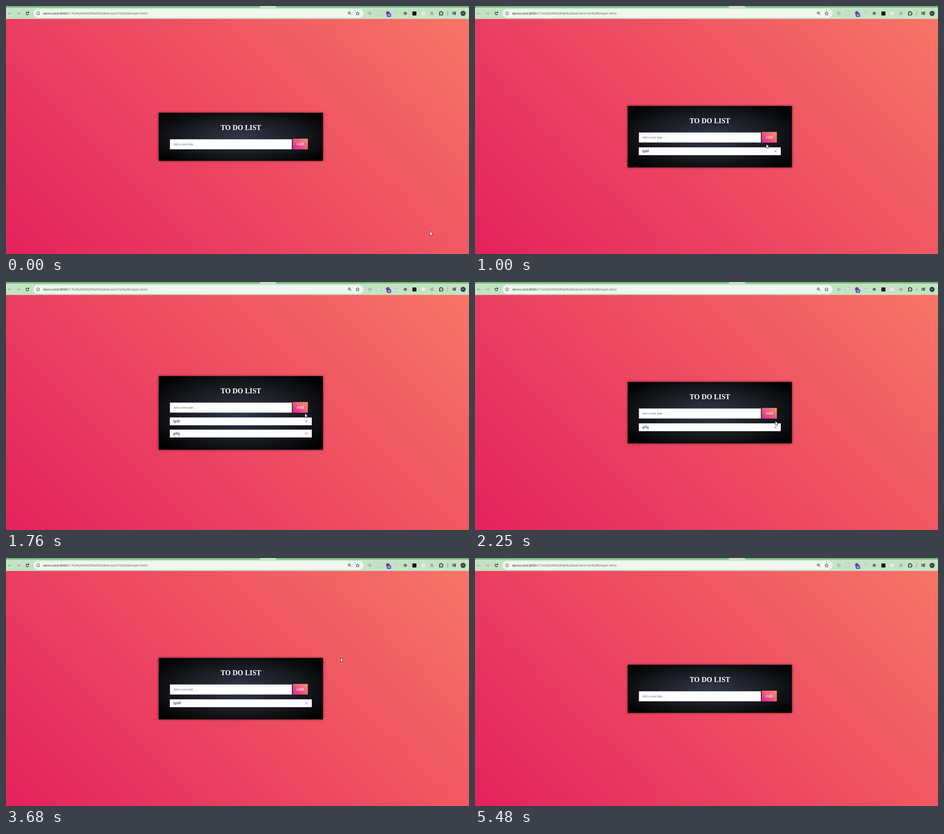
An HTML page that plays this animation: 1022 px wide and 548 px high, repeating every 5660 ms.

```html
<!DOCTYPE html>
<html lang="en">
<head>
<meta charset="utf-8">
<title>To do list</title>
<style>
  html, body { margin: 0; width: 100%; height: 100%; overflow: hidden; }
  svg { display: block; width: 1022px; height: 548px; }
  text { white-space: pre; }
  .url { font: 7.45px "Open Sans", "Noto Sans", sans-serif; fill: #4e5a50; }
  .host { fill: #1d2620; }
  .title { font: bold 15.7px "Liberation Serif", serif; fill: #fff; text-anchor: middle; }
  .field { font: 6.4px "Liberation Sans", sans-serif; }
  .add { font: 9px "Liberation Sans", sans-serif; fill: #fff; text-anchor: middle; }
  .task { font: 8px "Liberation Serif", serif; fill: #15101c; }
  .panel { filter: drop-shadow(0 0 2.7px rgba(0, 0, 0, .7)); }
  .line { fill: none; stroke: #3a423c; stroke-width: 1; }
  .bold { stroke: #1f2621; stroke-width: 1.2; }
  .pale { stroke: #879f89; }
</style>
</head>
<body>
<svg viewBox="0 0 1022 548" xmlns="http://www.w3.org/2000/svg">
  <defs>
    <linearGradient id="page" gradientUnits="userSpaceOnUse" x1="125.75" y1="673.75" x2="896.25" y2="-96.75">
      <stop offset="0" stop-color="#e4225d"/><stop offset="1" stop-color="#f77466"/>
    </linearGradient>
    <radialGradient id="dark" r=".707">
      <stop offset="0" stop-color="#34374a"/><stop offset=".5" stop-color="#191c21"/>
      <stop offset=".9" stop-color="#020203"/><stop offset="1" stop-color="#000"/>
    </radialGradient>
    <linearGradient id="warm" x1="0" y1="1" x2="1" y2="0">
      <stop offset="0" stop-color="#de2393"/><stop offset="1" stop-color="#f5976e"/>
    </linearGradient>
  </defs>

  <rect y="28" width="1022" height="520" fill="url(#page)"/>

  <!-- browser bar -->
  <rect width="1022" height="28.6" fill="#c4e2c5"/>
  <path d="M0 0H562Q561 3.5 557 3.5H0ZM595 0H1022V3.5H600Q596 3.5 595 0Z" fill="#78b87c"/>
  <rect x="61" y="6.5" width="728" height="19.5" rx="9.75" fill="#eef7ee"/>
  <path class="line pale" d="M12 16.3H5.2M8.2 13.2L5.1 16.3L8.2 19.4M24 16.3H30.8M27.8 13.2L30.9 16.3L27.8 19.4"/>
  <path class="line bold" d="M49.6 14.6A3 3 0 1 0 50 17.2M50.2 12.6V15H47.8"/>
  <circle cx="70.8" cy="16.3" r="5.6" fill="#fff"/>
  <circle class="line" cx="70.8" cy="16.3" r="3.5"/>
  <path class="line" d="M70.8 15.8V18.2M70.8 14.2V15"/>
  <text class="url" x="82" y="19"><tspan class="host">demo.test:8000</tspan>/7.Fix%20It%20Flat%20Article/3.Fix%20It/start.html</text>
  <path class="line" d="M760.5 17.5L762.6 19.8M756.3 15.3H759.2"/>
  <circle class="line" cx="757.8" cy="15.3" r="2.6"/>
  <path class="line" d="M776 12.3L777.2 15L780 15.2L777.9 17.1L778.5 19.9L776 18.4L773.5 19.9L774.1 17.1L772 15.2L774.8 15Z"/>
  <circle cx="803" cy="16.3" r="4" fill="#abc6ac"/>
  <rect x="819.3" y="12.8" width="7" height="7" fill="#d6e6d6" stroke="#a5b9a6" stroke-width=".6"/>
  <circle cx="843" cy="15.5" r="4" fill="#5b4494"/>
  <rect x="840.5" y="16" width="9.6" height="8" rx="2" fill="#5d44a5"/>
  <text x="845.3" y="22.2" text-anchor="middle" fill="#fff" style="font:bold 5.5px 'Liberation Sans',sans-serif">10</text>
  <path d="M860 13.5h1.3v1.3h-1.3ZM863.6 13.5h1.3v1.3h-1.3Z" fill="#7f9982"/>
  <circle cx="881.4" cy="16.3" r="3.5" fill="#68756a"/>
  <rect x="897" y="12" width="9" height="9" rx="1" fill="#151817"/>
  <rect x="917" y="12.8" width="8" height="7.4" rx="1" fill="#f4e6df"/>
  <circle cx="940" cy="16.3" r="4" fill="#a4b9a5"/>
  <path class="line bold" d="M956.7 13.4H959V12.2H961.2V13.4H963.5V15.6H964.8V17.6H963.5V20.2H956.7V17.9H958V15.8H956.7Z"/>
  <rect x="974" y="12" width="1.2" height="8.5" fill="#6eb276"/>
  <path class="line bold" d="M985.5 13.5H991M985.5 15.7H991M985.5 17.9H988.5M992 18V13H994"/>
  <circle cx="991" cy="18.2" r="1.4" fill="#1f2621"/>
  <circle cx="1009" cy="16.3" r="5.6" fill="#343b40"/>
  <text x="1009" y="18.2" text-anchor="middle" fill="#e8eee8" style="font:6px 'Open Sans',sans-serif">m</text>

  <!-- card -->
  <g id="card">
    <rect id="back" class="panel" x="337.2" width="362.3" fill="url(#dark)"/>
    <text class="title" x="518.4" y="38.3">TO DO LIST</text>
    <rect x="361.9" y="58.4" width="269.2" height="22.4" fill="#fff" stroke="#77777c" stroke-width=".6"/>
    <text id="field" class="field" x="369.6" y="72"></text>
    <rect id="caret" y="65.5" width=".7" height="8" fill="#111"/>
    <rect x="633" y="57.3" width="33.3" height="23.6" fill="url(#warm)"/>
    <text class="add" x="649.6" y="72">Add</text>
    <rect id="mark" x="656.5" y="64" width=".9" height="10" fill="#fbd3d8"/>
    <g id="tasks"></g>
  </g>

  <circle id="ring" r="6.5" cy="1" fill="#c8b41e" fill-opacity=".72"/>
  <g id="mouse">
    <path id="arrow" d="M0 0V9.3L2.1 7.4L3.5 10.4L5 9.7L3.7 6.8H6.4Z" fill="#fff" stroke="#1a1a1a" stroke-width=".7"/>
    <path id="beam" d="M-1.5 -4.5H1.5M0 -4.5V4.5M-1.5 4.5H1.5" fill="none" stroke="#111" stroke-width=".8"/>
  </g>
</svg>
<script>
const LOOP = 5660, KEY_MS = 40, CLICK_MS = 70, LEAVE = 5170, MARK_END = 5480;
const HOME = { x: 936, y: 498 };

// Each move ends with its action: a word is typed, 'add' and 'remove' click.
const moves = [
  { start: 40, end: 430, x: 550, y: 304, word: 'fgdd' },
  { start: 660, end: 900, x: 643, y: 305, act: 'add' },
  { start: 1160, end: 1320, x: 560, y: 291, word: 'gdfg' },
  { start: 1520, end: 1680, x: 660, y: 290, act: 'add' },
  { start: 1820, end: 1980, x: 663, y: 307, act: 'remove' },
  { start: 2440, end: 2600, x: 664, y: 320, act: 'remove' },
  { start: 2740, end: 2870, x: 570, y: 305, word: 'fgddf' },
  { start: 3180, end: 3390, x: 650, y: 306, act: 'add' },
  { start: 3590, end: 3860, x: 985, y: -18 },
  { start: 4050, end: 4570, x: 663, y: 321, act: 'remove' },
  { start: 4740, end: 5150, x: 961, y: 473 }
];

const $ = id => document.getElementById(id);
const show = (el, on) => el.setAttribute('visibility', on ? 'visible' : 'hidden');
const ease = u => u * u * (3 - 2 * u);

function stateAt(t) {
  let { x, y } = HOME, tasks = [], draft = '', focus = false, click = false, mark = false;
  for (const m of moves) {
    if (t < m.start) break;
    const k = ease(Math.min(1, (t - m.start) / (m.end - m.start)));
    x += (m.x - x) * k;
    y += (m.y - y) * k;
    if (t < m.end) break;
    click = Boolean(m.word || m.act) && t < m.end + CLICK_MS;
    if (m.word) {
      draft = m.word.slice(0, Math.floor((t - m.end) / KEY_MS));
      focus = true;
    } else if (m.act === 'add') {
      tasks.push(draft);
      draft = '';
      focus = false;
    } else if (m.act === 'remove') {
      tasks.shift();
    }
    mark = tasks.length === 0 && (mark || m.act === 'remove');
  }
  return { x, y, tasks, draft, focus, click, mark };
}

const taskRow = (word, i) => {
  const y = 91.3 + 26.9 * i;
  return `<rect x="361.6" y="${y}" width="313.4" height="17.3" fill="#fdfcff"/>
    <text class="task" x="369" y="${y + 11}">${word}</text>
    <path d="M660.6 ${y + 6}l5.4 5.4m0 -5.4l-5.4 5.4" stroke="#e04a52" stroke-width=".9"/>`;
};

function draw(t) {
  const { x, y, tasks, draft, focus, click, mark } = stateAt(t);
  const height = tasks.length ? 108.5 + 27 * tasks.length : 106;
  const top = Math.round(288.9 - height / 2);
  $('card').setAttribute('transform', `translate(0 ${top})`);
  $('back').setAttribute('height', height);
  $('tasks').innerHTML = tasks.map(taskRow).join('');

  const field = $('field');
  field.textContent = draft || 'Add a new task ...';
  field.setAttribute('fill', draft ? '#111' : '#757575');
  $('caret').setAttribute('x', 369.8 + (draft ? field.getComputedTextLength() : 0));
  show($('caret'), focus);

  const visible = t < LEAVE;
  const inField = x > 362 && x < 631 && y > top + 58 && y < top + 81;
  $('mouse').setAttribute('transform', `translate(${x} ${y})`);
  $('ring').setAttribute('transform', `translate(${x} ${y})`);
  show($('arrow'), visible && !inField);
  show($('beam'), visible && inField);
  show($('ring'), click);
  show($('mark'), mark && t < MARK_END);
}

function frame() {
  draw(performance.now() % LOOP);
  requestAnimationFrame(frame);
}
frame();
</script>
</body>
</html>
```
